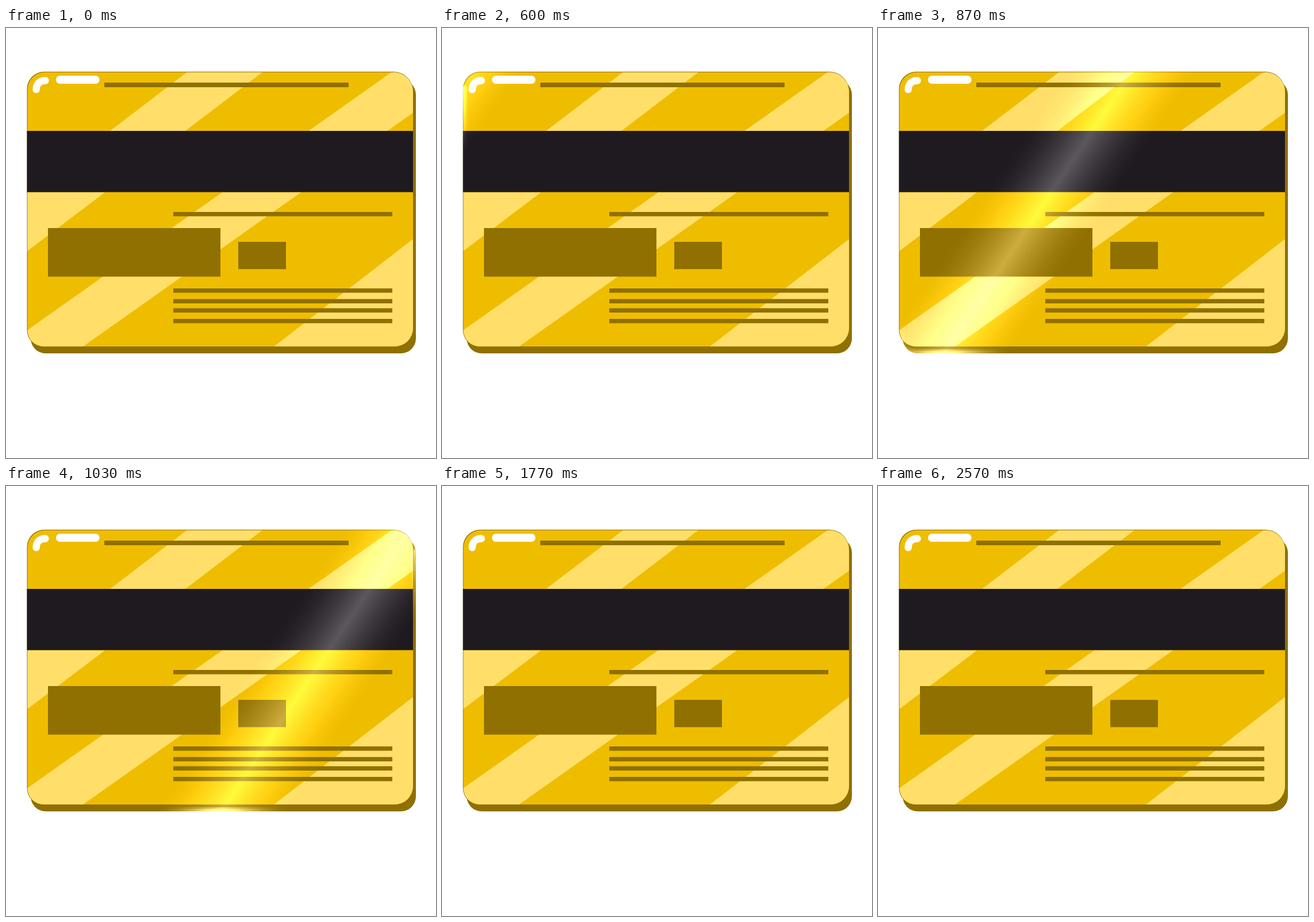
An HTML page with a canvas that plays this animation: 748x748 px, repeating every 2610 ms.

```html
<!DOCTYPE html>
<html lang="en">
<head>
<meta charset="utf-8">
<title>Gold card glint</title>
<style>
  html, body { margin: 0; width: 100%; height: 100%; overflow: hidden; background: #fff; }
  canvas { display: block; width: 748px; height: 748px; }
</style>
</head>
<body>
<canvas id="stage" width="748" height="748"></canvas>
<script>
const ctx = document.getElementById('stage').getContext('2d');
const GOLD = '#efbd00', LIGHT = '#ffdf69', BROWN = '#8f7000', INK = '#1f1a1f';
const LOOP = 2610, STEP = 100 / 3, LAST_STEP = 77;

// Glint: lines of constant x + LEAN * y, swept across the card at a steady speed
const LEAN = 0.667, HALF_WIDTH = 112;
const MID_TIME = 950, MID_POS = 622, SPEED = 1.5625;

function rounded(x, y, right, bottom, radii) {
  const path = new Path2D();
  path.roundRect(x, y, right - x, bottom - y, radii);
  return path;
}

const corners = [30, 34, 32, 28];
const base = rounded(36.5, 76, 708, 554, corners);
const front = rounded(37.5, 77, 708, 554, corners);
const back = rounded(43, 90, 713, 566, 26);
const outline = new Path2D(base);
outline.addPath(back);
const rim = new Path2D('M37 106V526Q37 566 70 566H687Q713 566 713 540V115');

function fill(path, color) {
  ctx.fillStyle = color;
  ctx.fill(path);
}

// Diagonal light band that starts at x on its top edge
function slant(x, top, bottom, slope = 1.414, width = 137) {
  const shift = (bottom - top) * slope;
  ctx.beginPath();
  ctx.moveTo(x, top);
  ctx.lineTo(x + width, top);
  ctx.lineTo(x + width - shift, bottom);
  ctx.lineTo(x - shift, bottom);
  ctx.fill();
}

function drawCard() {
  fill(back, BROWN);
  fill(base, BROWN);
  fill(front, GOLD);

  ctx.save();
  ctx.clip(front);
  ctx.fillStyle = LIGHT;
  slant(316, 76, 179, 1.31, 131);
  slant(672, 76, 179);
  slant(35, 286, 554, 1.324);
  slant(376, 286, 554);
  slant(813, 286, 554, 1.294, 300);
  ctx.restore();

  ctx.fillStyle = INK;
  ctx.fillRect(36.5, 179, 671.5, 106.5);
  ctx.fillStyle = BROWN;
  ctx.fillRect(171, 95, 425, 8);
  for (const y of [320, 453, 471.5, 487.5, 506]) ctx.fillRect(291, y, 381, 7.5);
  ctx.fillRect(73, 348, 300, 84.5);
  ctx.fillRect(404, 372, 83, 47.5);

  fill(rounded(87, 83, 162.5, 97, 6.5), '#fff');
  ctx.strokeStyle = '#fff';
  ctx.lineWidth = 12.5;
  ctx.lineCap = 'round';
  ctx.stroke(new Path2D('M68.5 91.5Q53.5 91.5 52.5 107'));
}

function glow(pos, peak) {
  const k = 1 + LEAN * LEAN;
  const at = u => [u / k, u * LEAN / k];
  const gradient = ctx.createLinearGradient(...at(pos - HALF_WIDTH), ...at(pos + HALF_WIDTH));
  for (let i = -8; i <= 8; i++) {
    const level = Math.pow(1 - Math.abs(i) / 8, 1.5);
    gradient.addColorStop((i + 8) / 16, `rgba(255,255,255,${peak * level})`);
  }
  return gradient;
}

function drawGlint(pos) {
  ctx.save();
  ctx.clip(outline);
  ctx.globalCompositeOperation = 'lighter';
  ctx.fillStyle = glow(pos, 0.24);
  ctx.fillRect(0, 0, 748, 748);
  ctx.strokeStyle = glow(pos, 0.24);
  for (const width of [14, 8]) {
    ctx.lineWidth = width;
    ctx.stroke(rim);
  }
  ctx.restore();
}

function render(now) {
  const time = Math.floor((now % LOOP) / 10) * 10;
  const step = Math.min(LAST_STEP, Math.floor((time + 5) / STEP));
  ctx.fillStyle = '#fff';
  ctx.fillRect(0, 0, 748, 748);
  drawCard();
  drawGlint(MID_POS + (step * STEP - MID_TIME) * SPEED);
}

const start = performance.now();
function tick() {
  render(performance.now() - start);
  requestAnimationFrame(tick);
}
tick();
</script>
</body>
</html>
```
